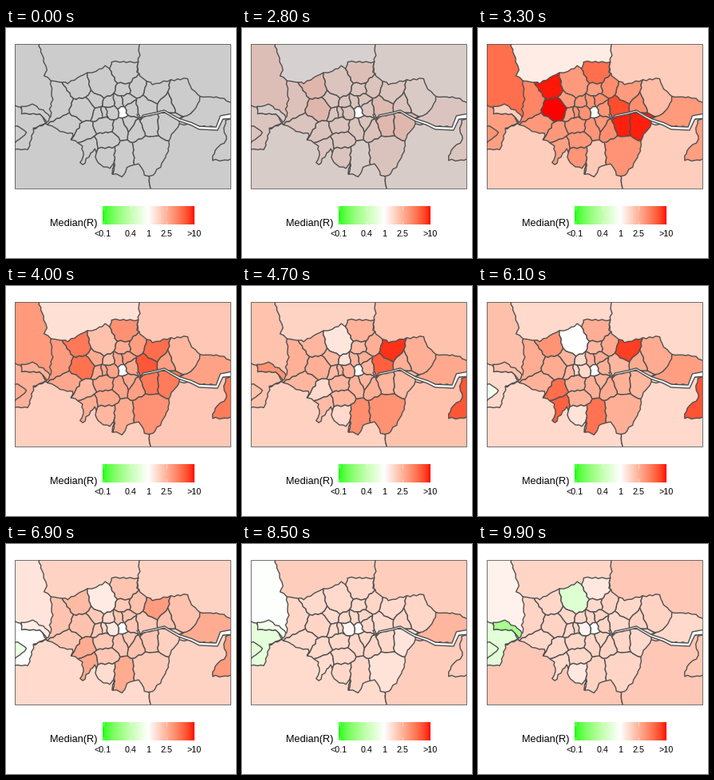
A matplotlib script for the animation above (10000 ms loop, 288x288 px).

```python
import numpy as np
import matplotlib.pyplot as plt
from matplotlib.animation import FuncAnimation
from matplotlib.patches import Polygon, Rectangle

SIZE = 288
FRAMES, STEP = 100, 100
EDGE = "#505050"

# CIELAB colours of the diverging scale and of missing data
WHITE = np.array([100, 0, 0])
GREY = np.array([82.05, 0, 0])
RED = np.array([53.24, 80.09, 67.20])
GREEN = np.array([87.73, -86.18, 83.18])


def lab_to_rgb(lab):
    L, a, b = lab
    fy = (L + 16) / 116
    f = np.array([fy + a / 500, fy, fy - b / 200])
    xyz = np.where(f > 6 / 29, f**3, (f - 4 / 29) * 0.1284)
    xyz = xyz * [0.95047, 1, 1.08883]
    lin = np.array([
        [3.2406, -1.5372, -0.4986],
        [-0.9689, 1.8758, 0.0415],
        [0.0557, -0.2040, 1.0570],
    ]) @ xyz
    lin = np.clip(lin, 0, 1)
    return np.clip(np.where(lin > 0.0031308,
                            1.055 * lin ** (1 / 2.4) - 0.055,
                            12.92 * lin), 0, 1)


def scale(v):
    """Lab colour for v = log10(R), from -1 to 1."""
    v = np.clip(v, -1, 1)
    return WHITE + abs(v) * ((RED if v > 0 else GREEN) - WHITE)


# Map geometry

def ragged(points, step=4.5, size=0.9):
    """Split edges and push the points along a fixed wavy field."""
    pts = np.asarray(points, float)
    out = []
    for p, q in zip(pts, np.roll(pts, -1, axis=0)):
        n = max(1, round(np.hypot(*(q - p)) / step))
        out.extend(p + (q - p) * k / n for k in range(n))
    out = np.array(out)
    x, y = out.T
    return out + size * np.column_stack([np.sin(0.8 * y + 0.3 * x),
                                         np.sin(0.7 * x - 0.4 * y)])


def clip(poly, normal, limit):
    """Keep the part of poly where p . normal <= limit."""
    out = []
    for p, q in zip(poly, poly[1:] + poly[:1]):
        dp, dq = p @ normal - limit, q @ normal - limit
        if dp <= 0:
            out.append(p)
        if dp * dq < 0:
            out.append(p + (q - p) * dp / (dp - dq))
    return out


def power_cell(name, sites, outline):
    """Cell of a weighted Voronoi diagram inside the outline."""
    *c, r = sites[name]
    c = np.array(c)
    poly = [np.array(p, float) for p in outline]
    for other, (x, y, s) in sites.items():
        if other != name:
            d = np.array([x, y])
            poly = clip(poly, 2 * (d - c), d @ d - c @ c - s * s + r * r)
    return poly


# Surrounding counties in painting order; London covers their inner parts
COUNTIES = {
    "herts": [(5, 14), (290, 14), (290, 205), (5, 205)],
    "bucks": [(5, 14), (40, 14), (45, 34), (51, 52), (48, 60), (60, 68),
              (60, 125), (5, 125)],
    "essex": [(166, 14), (290, 14), (290, 105), (200, 95), (165, 60),
              (165, 43), (167, 34)],
    "surrey": [(5, 205), (5, 140), (50, 120), (72, 122), (150, 150),
               (178, 178), (181, 205)],
    "kent": [(181, 205), (178, 178), (200, 120), (232, 121), (290, 111),
             (290, 205)],
    "windsor": [(5, 94), (19, 100), (20, 107), (43, 108), (50, 119),
                (35, 126), (28, 152), (5, 152)],
    "bracknell": [(5, 122), (18, 124), (26, 131), (17, 139), (5, 150)],
    "slough": [(19, 99), (34, 96), (46, 103), (56, 112), (53, 119),
               (43, 108), (20, 107)],
    "thurrock": [(243, 86), (268, 87), (290, 97), (290, 108), (272, 110),
                 (265, 124), (240, 123), (217, 114), (232, 107)],
    "medway": [(290, 112), (276, 115), (273, 125), (276, 140), (262, 153),
               (258, 165), (273, 166), (290, 162)],
}

LONDON = [
    (56, 66), (77, 69), (97, 58), (112, 54), (124, 48), (130, 50), (133, 42),
    (165, 43), (164, 56), (171, 63), (184, 71), (202, 66), (228, 63),
    (230, 72), (243, 86), (241, 95), (232, 107), (217, 114), (218, 120),
    (205, 137), (203, 155), (193, 174), (183, 185), (174, 185), (167, 171),
    (154, 172), (146, 186), (133, 182), (136, 168), (130, 175), (122, 174),
    (113, 165), (112, 152), (106, 157), (96, 172), (93, 169), (97, 160),
    (95, 147), (82, 139), (84, 132), (72, 131), (50, 119), (57, 110),
    (55, 102), (58, 90),
]

# Centre and rough radius of each borough
BOROUGHS = dict(
    hillingdon=(66, 92, 17), harrow=(92, 75, 15), barnet=(121, 69, 18),
    enfield=(147, 56, 15), waltham=(165, 74, 11), redbridge=(186, 80, 14),
    barking=(201, 94, 10), havering=(222, 86, 17), bexley=(201, 122, 14),
    greenwich=(181, 122, 13), bromley=(182, 160, 24), croydon=(148, 162, 15),
    sutton=(126, 161, 13), kingston=(104, 148, 10), merton=(125, 141, 11),
    richmond=(97, 130, 12), hounslow=(82, 121, 13), ealing=(95, 101, 15),
    brent=(111, 88, 11), haringey=(146, 76, 10), camden=(130, 93, 8),
    islington=(141, 92, 8), hackney=(151, 90, 8), tower=(158, 101, 9),
    newham=(175, 98, 12), lewisham=(166, 127, 10), southwark=(154, 119, 8),
    lambeth=(143, 124, 8), wandsworth=(123, 122, 10),
    hammersmith=(116, 107, 6), kensington=(124, 106, 6),
    westminster=(132, 104, 8), city=(147, 104, 5.5),
)

RIVER = [(165, 108), (168, 115), (172, 110), (187, 107), (198, 104),
         (208, 110), (217, 115), (232, 120), (242, 125), (264, 126),
         (270, 112), (285, 110)]

# Typical level of each stage, and the areas that stand out from it
INNER = [0.53, 0.38, 0.40, 0.20, 0.21]
OUTER = [0.26, 0.32, 0.20, 0.26, 0.29]
SPECIAL = [
    dict(harrow=.98, ealing=1, bexley=.97, greenwich=.97, newham=.85,
         bucks=.72, enfield=.72, hillingdon=.62, herts=.1, croydon=.28,
         havering=.35, thurrock=.52, windsor=.5, bracknell=.55, medway=.5),
    dict(redbridge=.93, newham=.78, medway=.82, croydon=.58, bromley=.56,
         slough=.55, barnet=.13, camden=.15, richmond=.2, sutton=.2,
         herts=.23, surrey=.24, thurrock=.45),
    dict(redbridge=.9, medway=.83, kingston=.78, richmond=.72, croydon=.7,
         harrow=.55, thurrock=.5, barnet=0, sutton=.15, westminster=.2,
         camden=.2, kensington=.2, bracknell=-.08, bucks=.33, slough=.33),
    dict(bucks=-.02, slough=-.1, windsor=-.18, bracknell=-.2, surrey=.19,
         thurrock=.38, westminster=.05, bromley=.15, bexley=.14),
    dict(slough=-.55, barnet=-.23, windsor=-.2, bracknell=-.2, bucks=.07,
         herts=.22, thurrock=.2, westminster=.06, enfield=.12, sutton=.12),
]
# Frame at which each stage is passed; the third change slows down at its end
STAGE_FRAMES = [33, 47, 61, 72, 85, 99]
STAGES = [0, 1, 2, 2.75, 3, 4]

fig = plt.figure(figsize=(4, 4), dpi=72, facecolor="white")
ax = fig.add_axes([0, 0, 1, 1])
ax.axis("off")
ax.set_xlim(0, SIZE)
ax.set_ylim(SIZE, 0)

panel = Rectangle((10.5, 19.5), 270.5, 181, fill=False, ec=EDGE, lw=0.8,
                  zorder=5)
ax.add_patch(panel)


def draw(points, z=2):
    patch = ax.add_patch(Polygon(points, closed=True, fc="white", ec=EDGE,
                                 lw=1.4, joinstyle="round", zorder=z))
    patch.set_clip_path(panel)
    return patch


rng = np.random.default_rng(4)
areas = []


def add_area(name, points, base, spread):
    noise = rng.uniform(-spread, spread)
    levels = [hot.get(name, b * (1 + noise)) for hot, b in zip(SPECIAL, base)]
    areas.append((draw(ragged(points)), levels))


for name, points in COUNTIES.items():
    add_area(name, points, OUTER, 0)
for name in BOROUGHS:
    cell = power_cell(name, BOROUGHS, LONDON)
    if name == "city":  # no data
        draw(ragged(cell), 3)
    else:
        add_area(name, cell, INNER, 0.1)

# The river widens towards the east
mid = np.array(RIVER, float)
along = np.gradient(mid, axis=0)
along /= np.hypot(*along.T)[:, None]
half = 1.1 + 2 * np.linspace(0, 1, len(mid))[:, None] ** 3
side = half * along[:, ::-1] * [-1, 1]
draw(np.vstack([mid + side, (mid - side)[::-1]]), 3)

# Legend
LEFT, RIGHT, TOP, BOTTOM = 121, 236, 223, 246
bar = np.array([[lab_to_rgb(scale(v)) for v in np.linspace(-1, 1, 230)]])
ax.imshow(bar, extent=(LEFT, RIGHT, BOTTOM, TOP), aspect="auto",
          interpolation="nearest", zorder=2)
ax.set_xlim(0, SIZE)
ax.set_ylim(SIZE, 0)
ax.text(55, 248, "Median(R)", family="Liberation Sans", size=12.8)
for label, r in (("<0.1", 0.1), ("0.4", 0.4), ("1", 1), ("2.5", 2.5),
                 (">10", 10)):
    x = 178.5 + 57 * np.log10(r)
    ax.text(x, 261, label, family="Liberation Sans", size=10.7, ha="center")
    for y in (TOP, BOTTOM - 4.5):
        ax.plot([x, x], [y, y + 4.5], color="white", lw=0.5, zorder=3)


def update(frame):
    # No data at first, then fade in and move through the stages
    shown = np.clip((frame - 27) / 6, 0, 1)
    stage = np.interp(frame, STAGE_FRAMES, STAGES)
    for patch, levels in areas:
        lab = scale(np.interp(stage, range(5), levels))
        patch.set_facecolor(lab_to_rgb(GREY + shown * (lab - GREY)))
    return [patch for patch, _ in areas]


anim = FuncAnimation(fig, update, frames=FRAMES, interval=STEP,
                     repeat=True, repeat_delay=0)
plt.show()
```
